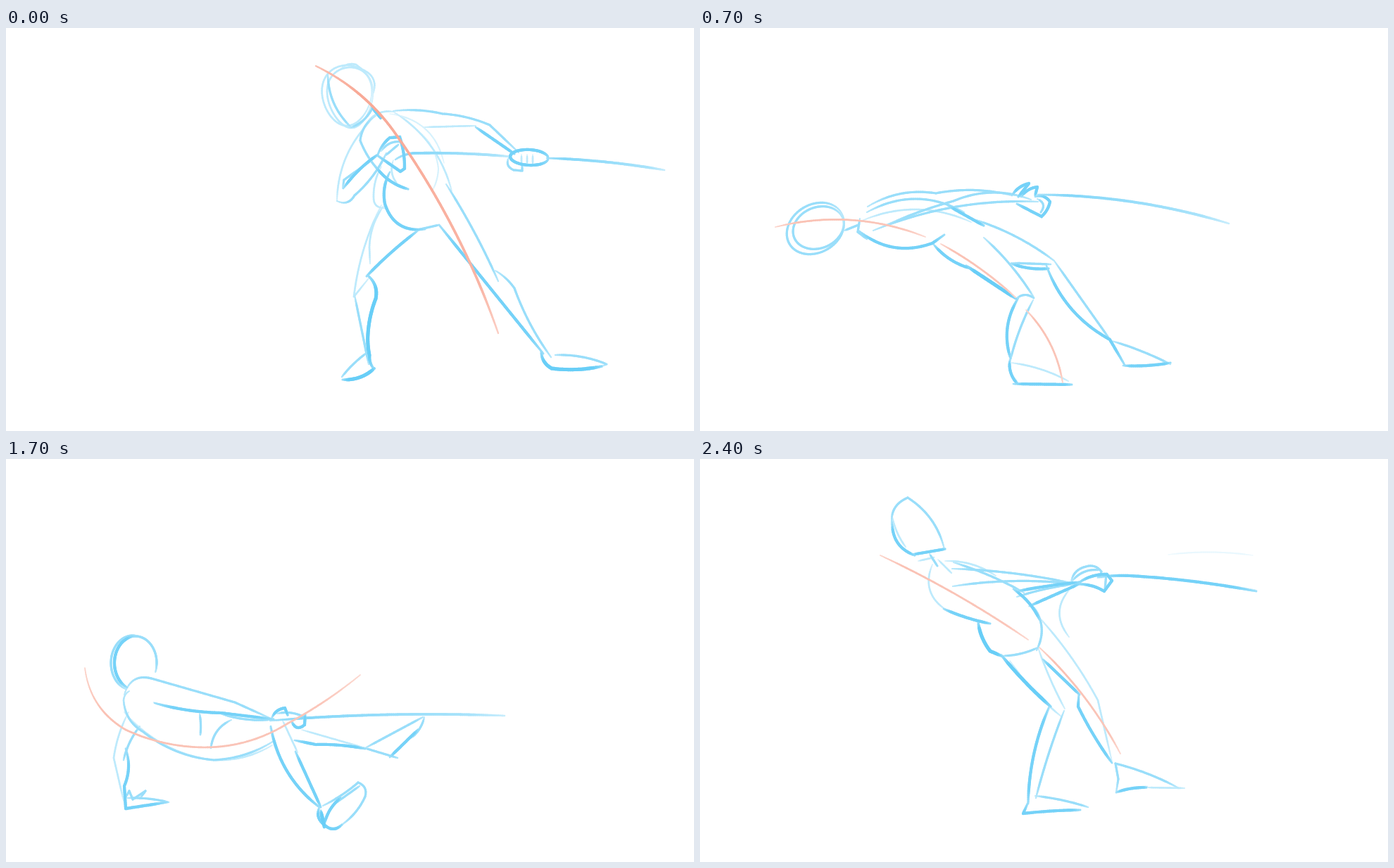
Write an HTML page with a canvas that moves like this. It is 977 px wide and 573 px high and loops after 2.9 s.

```html
<!DOCTYPE html>
<html lang="en">
<head>
<meta charset="utf-8">
<title>Gesture poses</title>
<style>
html, body { margin: 0; width: 100%; height: 100%; overflow: hidden; background: #fff; }
canvas { display: block; }
</style>
</head>
<body>
<canvas id="stage" width="977" height="573"></canvas>
<script>
const ctx = document.getElementById('stage').getContext('2d');
const BLUE = [98, 204, 247], CORAL = [247, 154, 132];
ctx.lineCap = 'round';

let seed = 1;
const jitter = size => {
  seed = seed * 16807 % 2147483647;
  return (seed / 2147483647 * 2 - 1) * size;
};

// Corner points [x, y, bow]; bow is how far the arc to that point swells to its right.
function arcs(points) {
  const path = [points[0]];
  for (let i = 1; i < points.length; i++) {
    const [x, y] = points[i - 1], [x2, y2, bow = 0] = points[i];
    const dx = x2 - x, dy = y2 - y, length = Math.hypot(dx, dy);
    const steps = Math.ceil(length / 3);
    for (let s = 1; s <= steps; s++) {
      const t = s / steps, swell = 4 * t * (1 - t) * bow / length;
      path.push([x + dx * t - dy * swell, y + dy * t + dx * swell]);
    }
  }
  return path;
}

// Egg-shaped loop; a positive egg narrows the lower end.
function loop(cx, cy, rx, ry, tilt = 0, egg = 0, from = 0, to = 2 * Math.PI) {
  const cos = Math.cos(tilt), sin = Math.sin(tilt), path = [];
  for (let i = 0; i <= 80; i++) {
    const angle = from + (to - from) * i / 80;
    const x = rx * Math.cos(angle) * (1 - egg * Math.sin(angle)), y = ry * Math.sin(angle);
    path.push([cx + x * cos - y * sin, cy + x * sin + y * cos]);
  }
  return path;
}

// Strength runs from start to end; both tips are thinner and paler.
function trace(path, color, width, start, end) {
  const last = path.length - 1;
  ctx.globalCompositeOperation = color === BLUE ? 'darken' : 'source-over';
  for (let i = 0; i < last; i++) {
    const t = i / last, press = Math.min(1, 6 * t + .1, 6 * (1 - t) + .1);
    const tone = (start + (end - start) * t) * (.65 + .35 * press);
    ctx.strokeStyle = `rgb(${color.map(c => Math.round(255 + (c - 255) * tone))})`;
    ctx.lineWidth = width * (.6 + .4 * press);
    ctx.beginPath();
    ctx.moveTo(...path[i]);
    ctx.lineTo(...path[i + 1]);
    ctx.stroke();
  }
}

// A pencil draws an arc chain; firm pencils restate it with a loose pale line.
function pencil(color, width, start, end = start) {
  const draw = (...points) => {
    trace(arcs(points), color, width, start, end);
    if (color === BLUE && width > 4) {
      const loose = points.map(([x, y, bow]) => [x + jitter(1.5), y + jitter(1.5), bow]);
      trace(arcs(loose), color, 2.4, .45, .45);
    }
  };
  draw.loop = (...shape) => trace(loop(...shape), color, width, start, end);
  return draw;
}

const faint = pencil(BLUE, 2, .26);
const light = pencil(BLUE, 2.6, .42);
const mid = pencil(BLUE, 3.2, .65);
const bold = pencil(BLUE, 4.2, .88);
const heavy = pencil(BLUE, 5, .96);
const pole = pencil(BLUE, 3.8, .82, .5);
const action = pencil(CORAL, 2.7, .62, .55);
const firmAction = pencil(CORAL, 3.6, .88, .7);

function windUp() {
  // head
  light.loop(484, 96, 35, 43, 0, .15);
  light.loop(489, 99, 32, 43, -.05, .2);
  mid([457, 64], [490, 141, 9]);
  light([474, 60], [497, 52, -4], [506, 59], [522, 92, -8]);
  mid([488, 142], [521, 112, 5]);
  bold([519, 112], [532, 128]);
  // pole arm
  light([510, 140], [550, 119, -8]);
  mid([550, 118], [620, 122, -3], [687, 138, -3], [728, 177]);
  light([593, 141], [667, 139]);
  bold([667, 141], [722, 179]);
  bold.loop(743, 184, 27, 11, .05);
  mid([714, 184], [721, 202, 5], [733, 203], [733, 194]);
  for (let x = 732; x < 752; x += 8) light([x, 180], [x, 192]);
  pole([553, 187], [580, 178, -2], [718, 183, -2]);
  pole([768, 185], [935, 202, -3]);
  // front arm
  bold([528, 180], [545, 156, -2], [559, 155], [566, 200, -2], [560, 204], [527, 181]);
  mid([538, 182], [557, 166]);
  mid([533, 175], [562, 162, -5]);
  light([517, 133], [470, 246, 12]);
  mid([470, 246], [495, 238, 6], [540, 178, 4]);
  bold([479, 228], [528, 180, -3]);
  mid([478, 228], [480, 216], [523, 185]);
  // torso
  mid([525, 125], [503, 160, 5], [540, 213, 4]);
  bold([525, 197], [571, 229, 5]);
  bold([545, 205], [538, 250, 4], [595, 286, 14]);
  light([550, 188], [556, 222, 5]);
  light([533, 197], [522, 240, 3], [538, 256, 6]);
  light([550, 119], [633, 232, -14]);
  faint([545, 122], [622, 192, -18]);
  faint([590, 150], [614, 200, -5], [605, 232, -2]);
  // rear leg
  mid([625, 222], [699, 360, -3]);
  mid([580, 288], [615, 280]);
  bold([615, 280], [763, 463]);
  mid([695, 345], [722, 370, -2], [774, 468, 4]);
  heavy([760, 460], [775, 484, 4], [846, 481, 3]);
  mid([846, 481], [853, 478], [780, 465, 4]);
  // front leg
  bold([585, 288], [512, 353, 2]);
  light([537, 252], [516, 312, 5], [517, 335]);
  light([533, 252], [494, 382, 6], [515, 356]);
  heavy([514, 352], [525, 385, -5], [514, 435, 2], [516, 465, 1], [522, 484, 2]);
  mid([495, 380], [515, 478]);
  mid([515, 460], [477, 496, 2]);
  heavy([478, 500], [523, 484, 5]);
  firmAction([440, 54], [555, 153, -10], [699, 434, -11]);
}

function reach() {
  mid.loop(788, 192, 35, 43, .25, .15);
  light.loop(790, 190, 36, 42, .2, .18);
  mid([733, 222], [748, 217]);
  mid([750, 215], [778, 236, 4], [770, 243]);
  // torso
  light([735, 217], [660, 221, 5], [590, 280, 9]);
  light([748, 217], [743, 270, -10]);
  bold([588, 275], [600, 314, 8], [650, 331, 5], [682, 294, 11]);
  bold([640, 282], [740, 275, 13]);
  // arms
  bold([710, 252], [815, 296, 4]);
  light([738, 238], [813, 293]);
  mid([803, 284], [905, 276]);
  mid([810, 299], [893, 289, 3]);
  mid([890, 281], [918, 255, 3], [911, 277], [943, 288, -4], [930, 298], [910, 298], [893, 289]);
  mid([918, 296], [948, 294, -3]);
  bold([943, 292], [982, 311, 3]);
  mid([820, 346], [912, 299, 2]);
  bold([728, 280], [743, 314, 4]);
  light([754, 272], [754, 312]);
  light([743, 314], [832, 328, 9]);
  bold([757, 302], [838, 328, -2]);
  mid([832, 326], [878, 304, -4], [865, 316]);
  mid.loop(858, 330, 26, 12);
  mid.loop(857, 328, 10, 9);
  mid([862, 320], [870, 340, -5]);
  light([830, 330], [804, 388, 7]);
  faint([845, 340], [828, 360]);
  // near leg
  mid([653, 335], [737, 354]);
  light([683, 302], [773, 346]);
  bold([737, 350], [739, 455, 6]);
  mid([770, 342], [737, 460, 3]);
  bold([735, 458], [734, 482], [757, 480], [770, 489], [813, 477, 5]);
  bold([740, 453], [813, 478, -3]);
  // far leg
  bold([586, 280], [580, 392, 7]);
  mid([630, 332], [588, 410, -2]);
  bold([580, 391], [568, 390], [515, 464, 3]);
  bold([592, 406], [517, 464, -3]);
  mid([520, 462], [478, 491, 2]);
  bold([478, 490], [484, 502, 3], [521, 507], [514, 470]);
  mid([498, 506], [515, 505, -7]);
  action([516, 462], [567, 363, -4]);
  action([571, 365], [612, 315, -3]);
  action([620, 307], [748, 233, -6]);
}

function leanBack() {
  mid.loop(164, 285, 43, 34, -.55);
  mid.loop(168, 284, 37, 29, -.4);
  mid([205, 288], [225, 280]);
  mid([227, 271], [224, 290], [237, 300]);
  // torso and arms
  bold([225, 288], [330, 306, 15], [347, 294]);
  mid([238, 254], [335, 235, -9], [443, 238, -6]);
  mid([237, 262], [375, 262, -19]);
  light([230, 274], [385, 276, -17]);
  mid([263, 281], [360, 246, -2], [470, 244, -11]);
  mid([246, 288], [480, 247, -13]);
  bold([443, 238], [467, 221, -3], [452, 240]);
  bold([456, 240], [479, 226, -3], [476, 238]);
  bold([476, 240], [497, 247, -4], [485, 268, -2], [450, 250]);
  mid([479, 243], [484, 262, -6]);
  pole([480, 237], [751, 278, -10]);
  bold([353, 253], [403, 281]);
  mid([403, 298], [474, 383, -4]);
  mid([385, 271], [503, 331, -6]);
  bold([332, 308], [385, 342, 5]);
  heavy([378, 338], [449, 385]);
  // far leg
  mid([442, 334], [498, 336]);
  bold([442, 335], [495, 342, 3]);
  mid([503, 331], [585, 447]);
  bold([492, 338], [582, 443, 13], [603, 479]);
  bold([601, 480], [668, 476, 2]);
  mid([585, 445], [668, 478, -2]);
  // near leg
  bold([452, 384], [441, 470, 10]);
  mid([473, 387], [440, 475, 3]);
  mid([449, 385], [474, 384, -5]);
  bold([440, 472], [450, 505, 4]);
  bold([445, 506], [528, 507]);
  light([442, 476], [523, 502, -4]);
  action([107, 283], [320, 297, -17]);
  action([342, 307], [448, 383, -4]);
  action([463, 401], [515, 504, -9]);
}

function fall() {
  bold.loop(184, 290, 30, 38, 0, 0, -1.6, -4.3);
  mid.loop(184, 290, 30, 38, 0, 0, .35, -1.9);
  mid.loop(180, 290, 31, 39, 0, 0, -1.1, -4.4);
  // torso
  mid([175, 330], [167, 343, 2], [195, 388, 7], [295, 428, 8], [380, 401, 6]);
  light([168, 360], [285, 427, 12], [378, 407, 8]);
  mid([168, 335], [210, 313, -12], [325, 346], [378, 370]);
  // pole arm
  bold([211, 347], [305, 361, 3], [380, 370]);
  mid([300, 360], [380, 370, 5]);
  mid([275, 362], [276, 392, -1]);
  mid([320, 371], [291, 411, 7]);
  bold([378, 367], [396, 354, -3], [400, 364]);
  mid([385, 362], [425, 368, -4]);
  bold([425, 362], [424, 378], [406, 374, -6]);
  pole([375, 372], [708, 365, -5]);
  // support arm
  light([174, 360], [153, 425, 3], [167, 486]);
  mid([190, 380], [167, 428, 3]);
  bold([170, 412], [168, 465, -5], [170, 497], [229, 488]);
  mid([172, 482], [231, 488, -2]);
  mid([168, 485], [175, 472], [180, 484], [198, 472], [190, 483]);
  // near leg
  bold([376, 380], [445, 495, 13]);
  light([392, 370], [414, 417]);
  bold([411, 416], [447, 495]);
  bold([445, 495], [452, 520, 5], [477, 520, 6]);
  mid([474, 522], [510, 480, 4], [500, 460, 5], [450, 493, -2]);
  bold([452, 520], [475, 482, -4]);
  mid([464, 492], [502, 465]);
  heavy([447, 500], [452, 523]);
  // far leg
  light([420, 385], [510, 411]);
  bold([410, 400], [440, 406], [510, 412, -2]);
  mid([506, 410], [556, 425]);
  bold([545, 424], [585, 385]);
  mid([510, 411], [592, 367]);
  mid([594, 367], [576, 396, -3]);
  action([112, 297], [170, 385, 13], [280, 410, 6], [400, 376, 9], [503, 307, 3]);
}

function crouch() {
  mid.loop(174, 240, 30, 41, -.08, .1);
  light.loop(173, 241, 32, 45, -.08, .1);
  bold([204, 240], [184, 279, -8], [185, 293]);
  // torso
  mid([185, 287], [175, 322, 7], [220, 375, 7]);
  bold([180, 345], [310, 396, 13], [335, 383, 4]);
  light([186, 288], [225, 285, -6], [267, 302]);
  mid([217, 283], [272, 333, -3]);
  bold([260, 317], [277, 334]);
  bold([270, 355], [275, 335], [305, 333, -3], [334, 365, -8], [318, 395, -8], [300, 395]);
  // pole arm
  bold([203, 306], [274, 312]);
  mid([274, 312], [352, 278, -1]);
  mid([269, 296], [350, 271, -2]);
  bold([347, 272], [355, 262], [383, 258], [385, 268], [377, 274]);
  bold([350, 276], [365, 288], [394, 292, 3], [396, 287], [380, 276]);
  mid([376, 275], [356, 272, 7]);
  bold([380, 274], [417, 271]);
  faint([417, 271], [495, 264]);
  pole([480, 264], [748, 295, -13]);
  // legs
  light([325, 330], [377, 323]);
  mid([345, 346], [416, 334]);
  light([356, 290], [365, 322, 6], [377, 337]);
  bold([335, 387], [388, 361, 3]);
  bold([388, 358], [455, 505, 2]);
  mid([415, 334], [455, 472, 5]);
  heavy([455, 505], [521, 499, 2]);
  mid([450, 469], [520, 499]);
  bold([352, 382], [340, 444]);
  bold([337, 441], [389, 425]);
  light([373, 374], [352, 418]);
  mid([352, 418], [389, 425, -3]);
  // support arm
  mid([174, 320], [160, 398, 5]);
  mid([161, 365], [160, 475, 5]);
  light([190, 360], [167, 408, 5]);
  bold([168, 408], [173, 420, -2], [160, 485, 2]);
  bold([160, 482], [210, 489]);
  bold([214, 496], [160, 493, -2], [154, 488], [160, 480]);
  light([160, 478], [180, 479, -10]);
  action([133, 254], [185, 310, 3], [265, 352, 3], [316, 391, -5]);
  firmAction([338, 391], [386, 397]);
  firmAction([408, 423], [475, 396, 2]);
  pencil(CORAL, 2, .5, .1)([473, 397], [512, 377]);
}

function pull() {
  mid([347, 128], [295, 55, 9], [273, 95, 9]);
  bold([273, 90], [305, 137, 10]);
  bold([301, 136], [348, 128]);
  light([272, 78], [292, 125, 3]);
  mid([326, 135], [337, 152]);
  light([338, 143], [357, 162]);
  light([310, 145], [332, 140]);
  // torso
  light([330, 150], [350, 215, 14]);
  bold([346, 213], [412, 234, 2]);
  heavy([395, 232], [412, 273, 3], [428, 280]);
  mid([428, 280], [480, 268, 3]);
  bold([445, 185], [482, 228, -4]);
  mid([470, 206], [478, 272, -11]);
  // arms, hands and pole
  mid([360, 147], [460, 190, -3]);
  light([348, 145], [420, 166, -6]);
  mid([358, 156], [530, 177, -4]);
  mid([359, 181], [535, 178, -6]);
  bold([450, 188], [540, 175, -1]);
  bold([468, 209], [540, 177]);
  mid([450, 196], [530, 178, -2]);
  mid([527, 175], [548, 153, -5], [570, 160, -4], [568, 167]);
  bold([535, 178], [578, 164, -4], [585, 173], [574, 188], [535, 178, 3]);
  mid([577, 163], [575, 186]);
  mid([528, 174], [568, 158, -6]);
  bold([565, 168], [610, 166, -1], [790, 188, -3]);
  light([527, 183], [524, 253, 15]);
  pencil(BLUE, 2, .14)([665, 136], [785, 137, -4]);
  // far leg
  bold([487, 285], [539, 335]);
  bold([538, 334], [537, 352], [585, 432, 2]);
  light([475, 218], [565, 343, -5], [585, 430]);
  mid([680, 468], [590, 433, 3], [594, 455], [591, 474]);
  bold([591, 474], [634, 467, -2]);
  light([632, 467], [688, 468]);
  // near leg
  heavy([428, 279], [498, 352, 2]);
  light([480, 268], [518, 355, 2]);
  light([440, 287], [513, 366, 4]);
  bold([496, 352], [466, 490, 7]);
  mid([517, 358], [477, 482, 2]);
  bold([466, 488], [459, 504], [540, 499, -1]);
  mid([476, 479], [551, 495, -2]);
  action([256, 137], [466, 257, -5]);
  action([482, 268], [597, 419, -8]);
}

const timeline = [
  { pose: windUp, end: 200 },
  { pose: reach, end: 700 },
  { pose: leanBack, end: 1700 },
  { pose: fall, end: 2200 },
  { pose: crouch, end: 2400 },
  { pose: pull, end: 2900 },
];
let shown = null;

function render(now) {
  const time = now % 2900;
  const { pose } = timeline.find(step => time < step.end);
  if (pose !== shown) {
    seed = 1;
    ctx.globalCompositeOperation = 'source-over';
    ctx.fillStyle = '#fff';
    ctx.fillRect(0, 0, 977, 573);
    pose();
    shown = pose;
  }
  requestAnimationFrame(render);
}
render(0);
</script>
</body>
</html>
```
